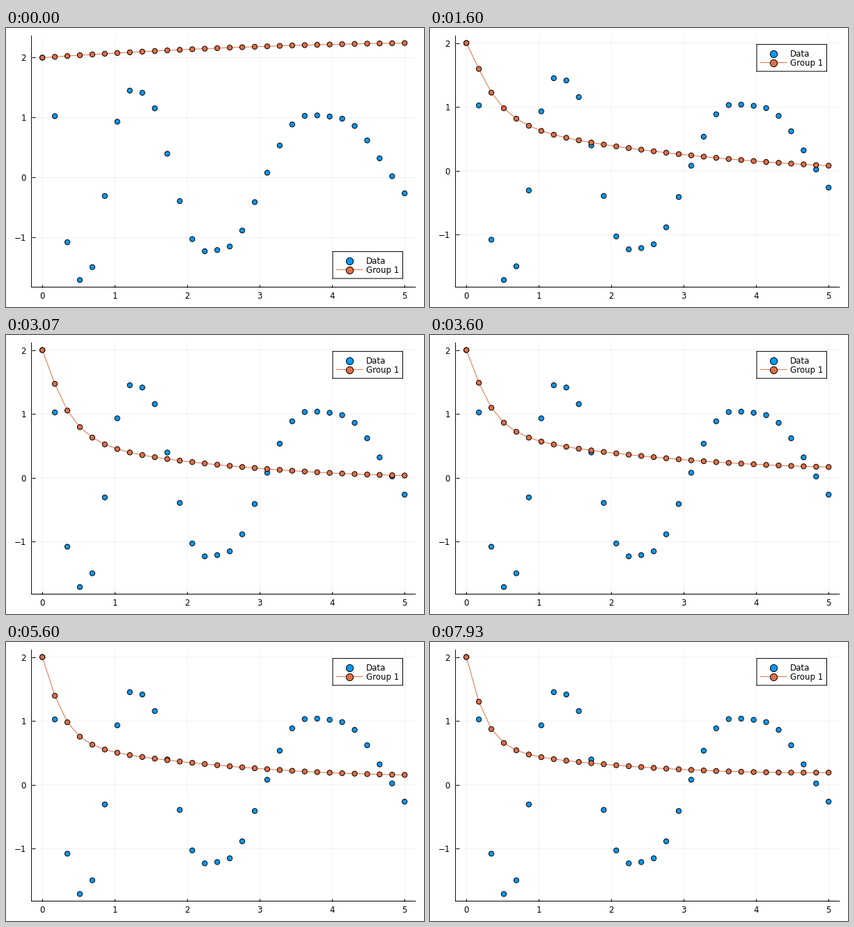
A matplotlib script that plays this animation: 600 by 400 pixels, repeating every 8 s.

```python
import numpy as np
import matplotlib.pyplot as plt
from matplotlib.animation import FuncAnimation

W, H, DPI = 600, 400, 100
FRAMES, LOOP_MS = 120, 8000
PT = 72 / DPI  # points per pixel
BLUE, ORANGE = "#009afa", "#e26f46"
LEGEND_LOW, LEGEND_HIGH = 320.6, 23.6

plt.rcParams.update({"font.family": "DejaVu Sans", "font.size": 11.8 * PT,
                     "axes.linewidth": PT, "path.snap": False})

x = np.linspace(0, 5, 30)
step = np.arange(FRAMES)


def spiral(u):
    a, b = u ** 3
    return np.array([-.1 * a - 2 * b, 2 * a - .1 * b])


def solve(u, count, substeps=100):
    """First component of the damped cubic spiral (Runge-Kutta)."""
    h = (x[1] - x[0]) / substeps
    out = [u[0]]
    for _ in range(count - 1):
        for _ in range(substeps):
            k1 = spiral(u)
            k2 = spiral(u + h / 2 * k1)
            k3 = spiral(u + h / 2 * k2)
            k4 = spiral(u + h * k3)
            u = u + h / 6 * (k1 + 2 * k2 + 2 * k3 + k4)
        out.append(u[0])
    return np.array(out)


def ease(q, k, v):
    """Smooth cubic path through the values v at times k."""
    k, v = np.array(k, float), np.array(v)
    slope = np.gradient(v, k)
    i = np.clip(np.searchsorted(k, q, side="right") - 1, 0, len(k) - 2)
    h = k[i + 1] - k[i]
    t = (q - k[i]) / h
    return (v[i] + t * t * (3 - 2 * t) * (v[i + 1] - v[i])
            + h * t * (1 - t) * ((1 - t) * slope[i] - t * slope[i + 1]))


# Shape of the fit over time: end value, end slope, decay time, softness of the start
KEYS = {
    0: (2.243, .016, .8, .4),
    8: (-.55, -.25, .8, .4),
    12: (-.53, -.244, .39, .18),
    26: (.15, -.032, .36, .06),
    38: (.183, -.023, .348, .043),
    54: (.17, -.024, .292, .043),
    69: (.147, -.025, .265, .043),
    99: (.177, -.003, .238, .035),
    119: (.193, .01, .23, .03),
}
end, slope, decay, soft = (ease(step, list(KEYS), v) for v in zip(*KEYS.values()))
curve = .0165 - .023 * np.clip(1 - step / 12, 0, 1)
end -= .145 * np.exp(-((step - 46) / 2.2) ** 2 / 2)  # brief unstable dip


def fit(n):
    """Parabolic tail plus a fast decay that starts at 2."""
    tail = end[n] + slope[n] * (x - 5) + curve[n] * (x - 5) ** 2
    return tail + (2 - tail[0]) * np.exp((soft[n] - np.hypot(x, soft[n])) / decay[n])


def box(left, top, width, height):
    return [left / W, 1 - (top + height) / H, width / W, height / H]


def dots(axes, xs, ys, color, size):
    return axes.scatter(xs, ys, s=np.full(len(xs), (size * PT) ** 2), color=color,
                        edgecolors="black", linewidths=PT, clip_on=False, zorder=3)


data = solve(np.array([2., 0.]), len(x))

fig = plt.figure(figsize=(W / DPI, H / DPI), dpi=DPI, facecolor="white")
ax = fig.add_axes(box(36.6, 11.4, 551.2, 360.1))
ax.spines[["top", "right"]].set_visible(False)
dots(ax, x, data, BLUE, 7.2)
fit_line, = ax.plot(x, fit(0), color=ORANGE, lw=PT, zorder=3)
fit_dots = dots(ax, x, fit(0), ORANGE, 7.2)
ax.set_xlim(-.15, 5.15)
ax.set_xticks(range(6))
ax.set_yticks(range(-1, 3))
ax.tick_params(direction="in", length=4.5 * PT, width=PT)
ax.tick_params(axis="x", pad=6 * PT)
ax.tick_params(axis="y", pad=7.6 * PT)
ax.set_axisbelow(True)
ax.grid(color="black", alpha=.08, lw=.7 * PT)

legend = fig.add_axes(box(469, LEGEND_LOW, 100.5, 38.5), zorder=2)
legend.plot([5.5, 43], [26, 26], color=ORANGE, lw=PT)
for label, y, color in (("Data", 13, BLUE), ("Group 1", 26, ORANGE)):
    dots(legend, [24.4], [y], color, 10.2)
    legend.text(47.6, y + 4.6, label)
legend.set(xlim=(0, 100.5), ylim=(38.5, 0), xticks=[], yticks=[])


def draw(n):
    y = fit(n)
    low, high = min(data.min(), y.min()), max(data.max(), y.max())
    margin = .03 * (high - low)
    ax.set_ylim(low - margin, high + margin)
    fit_line.set_ydata(y)
    fit_dots.set_offsets(np.column_stack([x, y]))
    crowded = y[x > 4].max() > 1.6
    legend.set_position(box(469, LEGEND_LOW if crowded else LEGEND_HIGH, 100.5, 38.5))
    return fit_line, fit_dots, legend


anim = FuncAnimation(fig, draw, frames=FRAMES, interval=LOOP_MS / FRAMES,
                     repeat=True, repeat_delay=0, blit=False)
plt.show()
```
